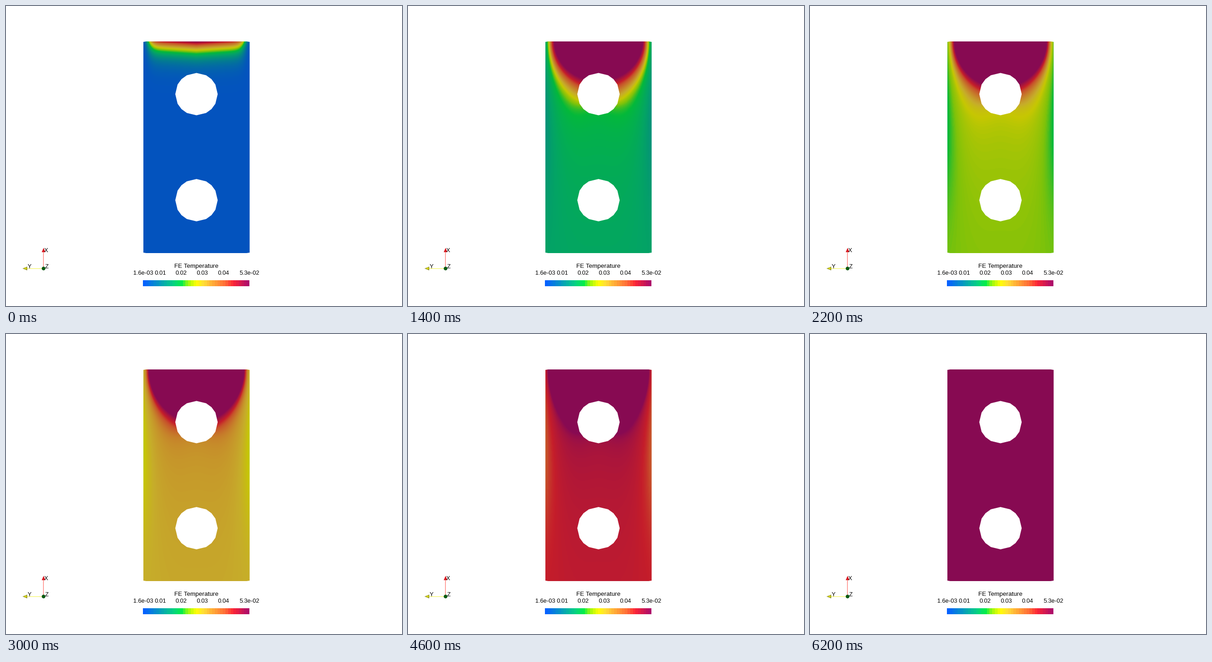
Write a matplotlib script that moves like this. It is 859 px wide and 652 px high and loops after 8 s.

```python
import numpy as np
import matplotlib.pyplot as plt
from matplotlib.animation import FuncAnimation
from matplotlib.colors import LinearSegmentedColormap
from matplotlib.patches import Circle, Polygon

W, H, DPI = 859, 652, 64
FRAMES, INTERVAL, LAST_STEP = 40, 200, 31
WARM_UP = 7  # steps until the hot zone has its final shape
LEFT, RIGHT, TOP, BOTTOM = 298, 529, 77, 537
MID, RADIUS = 413.2, 46
HOLES = (191.5, 422)
SHADE = 0.78

# Key colours, at positions in fourteenths of the range
KEYS = {0: "#0561ff", 4: "#05d47f", 5: "#04ed4b", 6: "#a4f90c", 7: "#ffff03",
        8: "#ffdd37", 11: "#ff6837", 12: "#fd2636", 14: "#ae0d6a"}
rainbow = LinearSegmentedColormap.from_list(
    "rainbow", [(k / 14, color) for k, color in KEYS.items()], N=256)

X, Y = np.meshgrid(np.arange(LEFT, RIGHT) + 0.5, np.arange(TOP, BOTTOM) + 0.5)
DX, DEPTH = np.abs(X - MID), Y - TOP
SIDE = DX / 115.5


def sigmoid(x):
    return 1 / (1 + np.exp(-np.clip(x, -50, 50)))


def bowl_depth(depth):
    """Depth b of the half ellipse through each point; wider when deeper."""
    low, high = np.full_like(depth, 1.0), np.full_like(depth, 1500.0)
    for _ in range(22):
        b = (low + high) / 2
        a = 115 - 20 * np.exp((83 - b) / 55)
        outside = (DX / a) ** 2 + (depth / b) ** 2 > 1
        outside |= a <= 0
        low, high = np.where(outside, b, low), np.where(outside, high, b)
    return high


def bowl(growth):
    """Hot zone below the top edge, shielded by the upper hole."""
    shadow = np.exp(-(DX / 45) ** 2) * sigmoid((Y - 215) / 6)
    b = bowl_depth(DEPTH / growth) + 40 * shadow
    return (np.exp(-(b / 45) ** 2) + 0.85 * sigmoid((105 - b) / 23)
            + 0.16 * np.exp(-b / 190))


def excess(step):
    t = step / WARM_UP
    weight = t ** 0.5
    rim = 0.065 * DX + 80 * SIDE ** 14
    layer = 0.96 * np.exp(-((DEPTH + rim) / 26) ** 1.2)
    return (1 - weight) * layer + weight * bowl(0.3 + 0.7 * t ** 0.6)


HEAT = [excess(step) for step in range(WARM_UP + 1)]
EDGE_LOSS = SIDE ** 6 * np.exp(-((Y - 250) / 180) ** 2)


def plate_image(step):
    base = 0.025 + 0.0365 * step
    loss = 0.105 * (1 - np.exp(-step / 8)) * EDGE_LOSS
    value = base + HEAT[min(step, WARM_UP)] - loss
    return rainbow(np.clip(value, 0, 1))[..., :3] * SHADE


def pt(size):
    return size * 72 / DPI


fig = plt.figure(figsize=(W / DPI, H / DPI), dpi=DPI, facecolor="white")
ax = fig.add_axes([0, 0, 1, 1])


def label(x, y, text, size=12.8):
    ax.text(x, y, text, fontsize=pt(size), family="Liberation Sans",
            color="black", ha="center", va="baseline", zorder=6)


def shape(points, color, z=4):
    ax.add_patch(Polygon(points, closed=True, fc=color, ec="none", zorder=z))


def axis_line(xs, ys, color):
    ax.plot(xs, ys, color=color, lw=pt(1), snap=False, zorder=3)


# Plate with two faceted holes
plate = ax.imshow(plate_image(0), extent=(LEFT, RIGHT, BOTTOM, TOP),
                  interpolation="nearest", zorder=1)
plate.set_clip_path(Polygon(
    [(298, 78), (304, 77), (522, 77), (528.5, 78),
     (528.5, 536), (522, 537), (304, 537), (298, 536)],
    transform=ax.transData))
angles = np.radians([quarter + a for quarter in range(0, 360, 90)
                     for a in (0, 27, 45, 63)])
ring = RADIUS * np.column_stack([np.cos(angles), np.sin(angles)])
for cy in HOLES:
    shape(ring + (MID, cy), "white", 2)

# Colour bar
bands = rainbow(np.linspace(0, 1, 40))[None, :, :3]
ax.imshow(bands, extent=(297, 528, 609, 596.5), interpolation="nearest",
          zorder=1)
label(413, 568.5, "FE Temperature", 13.4)
label(297.5, 584.5, "1.6e-03")
label(528.5, 584.5, "5.3e-02")
for k in range(1, 5):
    label(288.8 + 45.7 * k, 584.5, f"{k / 100:.2f}")

# Orientation axes
axis_line([81.2, 81.2], [570, 534], "#ff4a40")
axis_line([81.5, 45], [570.7, 570.7], "#f4f43c")
shape([(81.5, 525.5), (77.5, 535), (85.5, 535)], "#d81c24")
shape([(36, 570.5), (46, 566.5), (46, 574.5)], "#77771a")
shape([(37.5, 570.5), (45, 567.5), (45, 573)], "#d6d618")
ax.add_patch(Circle((81.5, 570.5), 4, fc="#0a5a14", ec="none", zorder=5))
for x, y, name in [(87.2, 535, "X"), (50.8, 570.5, "Y"), (88, 570.5, "Z")]:
    label(x, y, name, 12.5)

ax.set_xlim(0, W)
ax.set_ylim(H, 0)
ax.set_aspect("auto")
ax.axis("off")


def update(i):
    plate.set_data(plate_image(min(i, LAST_STEP)))
    return (plate,)


anim = FuncAnimation(fig, update, frames=FRAMES, interval=INTERVAL,
                     repeat=True, repeat_delay=0, blit=False)
plt.show()
```
